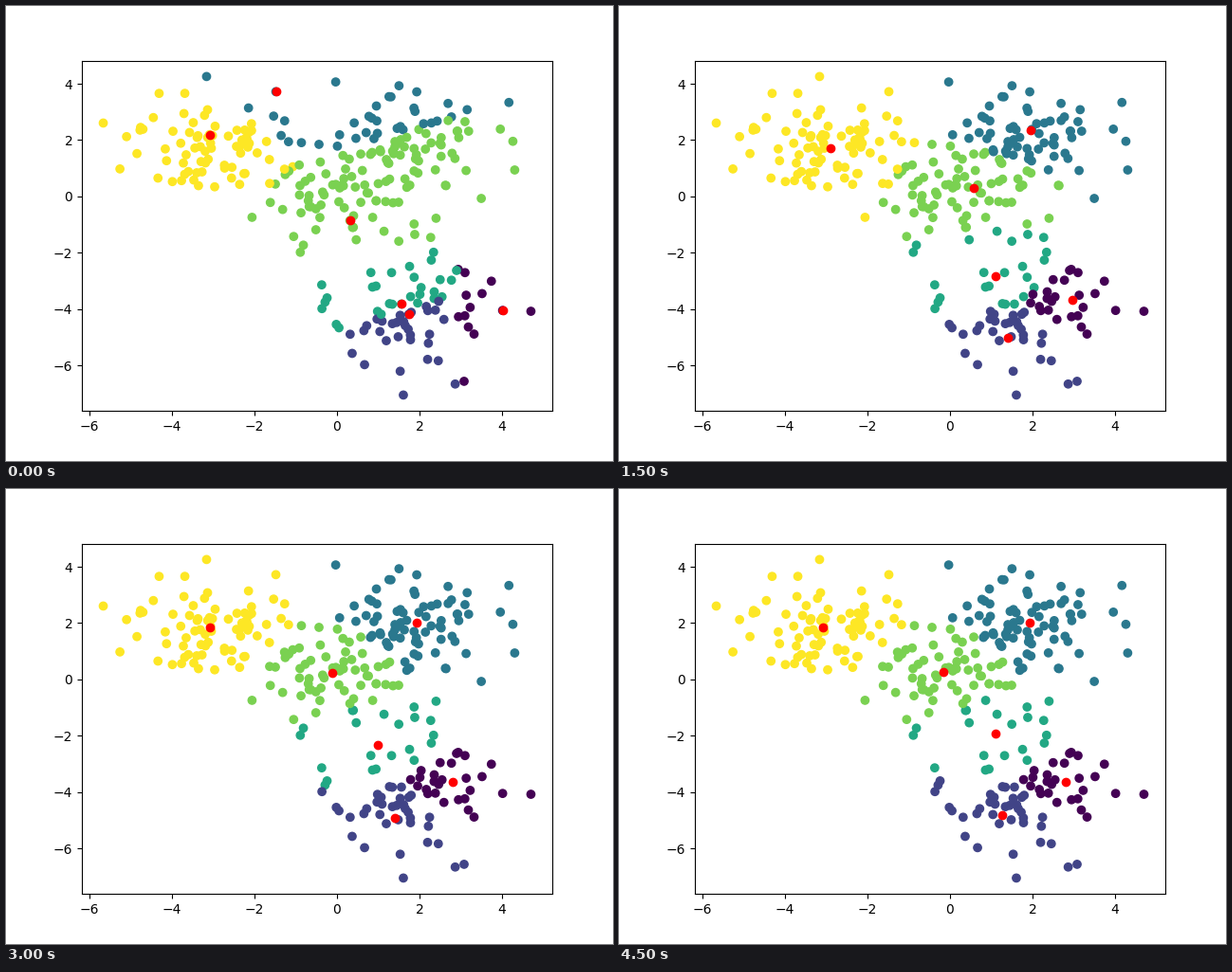
A matplotlib script for the animation above (5000 ms loop, 640x480 px).

```python
import numpy as np
import matplotlib.pyplot as plt
from matplotlib.animation import FuncAnimation

STEPS = 10
BLOBS = [(0, 0), (2, 2), (-3, 2), (2, -4)]
SEEDS = [(4.02, -4.06), (1.76, -4.18), (-1.47, 3.72),
         (1.57, -3.83), (0.33, -0.86), (-3.07, 2.16)]


def make_points(per_blob=75):
    rng = np.random.RandomState(0)
    pts = np.vstack([rng.normal(loc=c, scale=1.0, size=(per_blob, 2))
                     for c in BLOBS])
    order = np.arange(len(pts))
    rng.shuffle(order)
    return pts[order]


def distances(a, b):
    return np.linalg.norm(a[:, None] - b[None], axis=2)


def lloyd(pts, steps):
    """Return (centers, labels) for each k-means step."""
    # every starting center is the data point closest to its seed
    centers = pts[distances(np.array(SEEDS), pts).argmin(axis=1)]
    history = []
    for _ in range(steps):
        labels = distances(pts, centers).argmin(axis=1)
        history.append((centers, labels))
        centers = np.array([pts[labels == k].mean(axis=0)
                            for k in range(len(SEEDS))])
    return history


points = make_points()
history = lloyd(points, STEPS)

fig, ax = plt.subplots(figsize=(6.4, 4.8), dpi=100)
dots = ax.scatter(points[:, 0], points[:, 1], c=history[0][1],
                  cmap="viridis", vmin=0, vmax=len(SEEDS) - 1)
means = ax.scatter(history[0][0][:, 0], history[0][0][:, 1], c="r")


def update(i):
    centers, labels = history[i]
    dots.set_array(labels)
    means.set_offsets(centers)
    return dots, means


anim = FuncAnimation(fig, update, frames=STEPS, interval=500,
                     repeat=True, repeat_delay=0)
plt.show()
```
